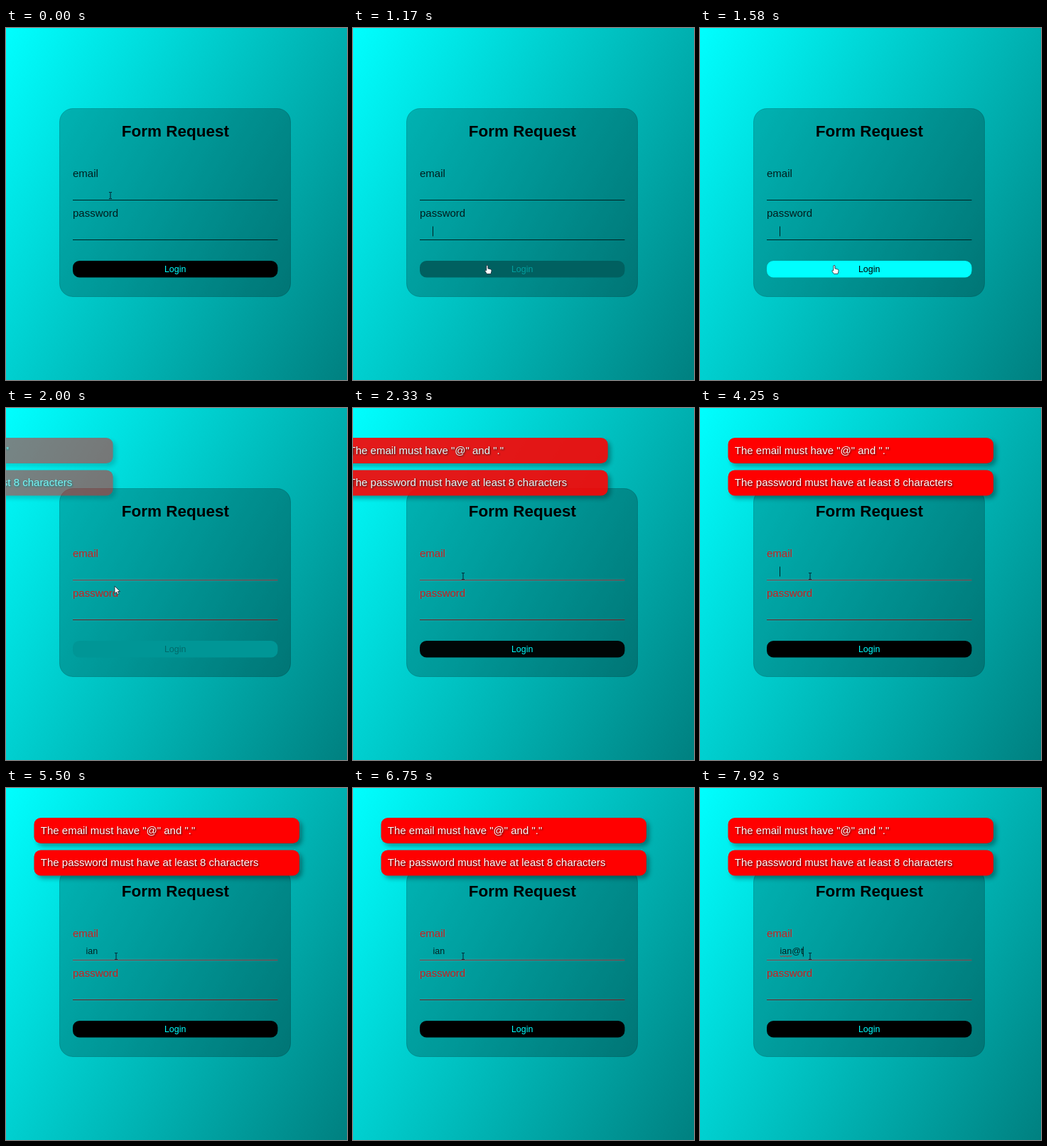
An HTML page for the animation above (8000 ms loop, 480 px wide and 496 px high).

```html
<!DOCTYPE html>
<html lang="en">
<head>
<meta charset="utf-8">
<title>Form Request</title>
<style>
  html, body { margin: 0; height: 100%; overflow: hidden; }
  svg {
    display: block; width: 100vw; height: 100vh;
    background: linear-gradient(120deg, aqua, teal);
    font: 15px Arial, "Liberation Sans", sans-serif;
  }
  .title { font-size: 22.5px; font-weight: bold; }
  .small { font-size: 12.5px; }
  .mid { text-anchor: middle; }
  .label { opacity: .82; }
  .notice rect { fill: red; filter: drop-shadow(4px 4px 3px rgba(0, 0, 0, .35)); }
  .notice text { fill: white; filter: drop-shadow(1.5px 1.5px 1px rgba(0, 0, 0, .8)); }
  .wave { fill: none; stroke: #c22; stroke-width: .9; }
</style>
</head>
<body>
<svg viewBox="0 0 480 496">
  <rect x="75.5" y="113.5" width="325" height="265" rx="18.5" fill="rgba(0,0,0,.23)" stroke="rgba(0,0,0,.2)"/>
  <text class="title mid" x="238.3" y="153">Form Request</text>

  <text class="label" x="94" y="210">email</text>
  <text class="small" id="typed" x="112.6" y="234" fill="#022"></text>
  <path class="wave" id="wave"/>
  <rect class="line" x="94" y="242" width="288.5" height="1"/>

  <text class="label" x="94" y="266">password</text>
  <rect class="line" x="94" y="298" width="288.5" height="1"/>
  <rect id="caret" width="1" height="14" fill="#022"/>

  <rect id="button" x="94" y="328" width="288.5" height="23.5" rx="9.4"/>
  <text class="small mid" id="login" x="238.2" y="344">Login</text>

  <g class="notice" id="notices">
    <rect x="39.5" y="42" width="373.5" height="36" rx="9.4"/>
    <text x="48.8" y="65">The email must have "@" and "."</text>
    <rect x="39.5" y="87.4" width="373.5" height="36" rx="9.4"/>
    <text x="48.8" y="110">The password must have at least 8 characters</text>
  </g>

  <g id="pointer">
    <path id="beam" d="M-2-4.5h1.5l.5.5.5-.5H2M0-4V4M-2 4.5h1.5L0 4l.5.5H2" fill="none" stroke="#012" stroke-width=".9"/>
    <path id="arrow" d="M0 0V10.5L2.5 8.3 4.2 12 6 11.2 4.4 7.6H7.6Z" fill="white" stroke="#123" stroke-width=".8"/>
    <path id="hand" d="M-1.2 0Q0-1.4 1 0V4L5 5Q6.4 5.4 6 7.5L5 11.5H-.5L-3.2 7.6Q-3.6 6-1.2 6.8Z" fill="white" stroke="#123" stroke-width=".8"/>
  </g>
</svg>
<script>
const LOOP = 8000, ERROR = 1725;
const $ = id => document.getElementById(id);
const clamp = v => Math.min(1, Math.max(0, v));
const show = (el, on) => el.setAttribute('visibility', on ? 'visible' : 'hidden');

// The CSS "ease" curve, solved by bisection
function ease(x) {
  x = clamp(x);
  let lo = 0, hi = 1, s;
  for (let i = 0; i < 24; i++) {
    s = (lo + hi) / 2;
    if (.75 * s * (1 - s) + s ** 3 < x) lo = s; else hi = s;
  }
  return .3 * s * (1 - s) ** 2 + 3 * s * s * (1 - s) + s ** 3;
}

const path = [ // time, x, y
  [0, 147, 236], [170, 147, 236], [500, 140, 286], [700, 140, 286],
  [1030, 184, 329], [1150, 189, 335], [1800, 189, 335], [1850, 186, 327],
  [2000, 153, 251], [2170, 155, 237], [LOOP, 155, 237]
];
const keys = [[4830, 'i'], [5000, 'a'], [5170, 'n'], [7830, '@'], [7920, 't']];
const caretOn = [[4170, 5500], [5920, 6580], [6920, 7250], [7830, LOOP]];
const within = (t, [a, b]) => t >= a && t < b;

function pointerAt(t) {
  const i = path.findIndex(p => p[0] > t);
  const [a, x, y] = path[i - 1], [b, u, v] = path[i];
  const k = (t - a) / (b - a);
  return [x + (u - x) * k, y + (v - y) * k];
}

let wave = 'M112.6 236.5';
for (let i = 0; i < 8; i++) wave += `l2.08 ${i % 2 ? -1 : 1}`;
$('wave').setAttribute('d', wave);

function draw(t) {
  const failed = t >= 1790;
  document.querySelectorAll('.label').forEach(el => el.setAttribute('fill', failed ? '#f00' : '#000'));
  document.querySelectorAll('.line').forEach((el, i) =>
    el.setAttribute('fill', failed ? ['#a04048', '#7c2226'][i] : '#022'));

  const hover = t < 1850 ? ease((t - 1030) / 600) : 1 - ease((t - 1850) / 600);
  const cyan = k => `rgb(0,${255 * k},${255 * k})`;
  $('button').setAttribute('fill', cyan(hover));
  $('login').setAttribute('fill', cyan(1 - hover));

  const slide = ease((t - ERROR) / 1000);
  $('notices').setAttribute('transform', `translate(${490 * (slide - 1)})`);
  $('notices').setAttribute('opacity', slide);

  $('typed').textContent = keys.filter(k => t >= k[0]).map(k => k[1]).join('');
  show($('wave'), t >= 7830);

  const inPassword = within(t, [600, 1700]);
  show($('caret'), inPassword || caretOn.some(span => within(t, span)));
  $('caret').setAttribute('x', 112 + $('typed').getComputedTextLength());
  $('caret').setAttribute('y', inPassword ? 279.5 : 223.5);

  const [x, y] = pointerAt(t);
  $('pointer').setAttribute('transform', `translate(${x} ${y})`);
  const kind = within(y, [328, 352]) ? 'hand'
    : within(y, [222, 243]) || within(y, [278, 299]) ? 'beam' : 'arrow';
  for (const id of ['beam', 'arrow', 'hand']) show($(id), id === kind);
}

const start = performance.now();
function tick() {
  draw((performance.now() - start) % LOOP);
  requestAnimationFrame(tick);
}
tick();
</script>
</body>
</html>
```
